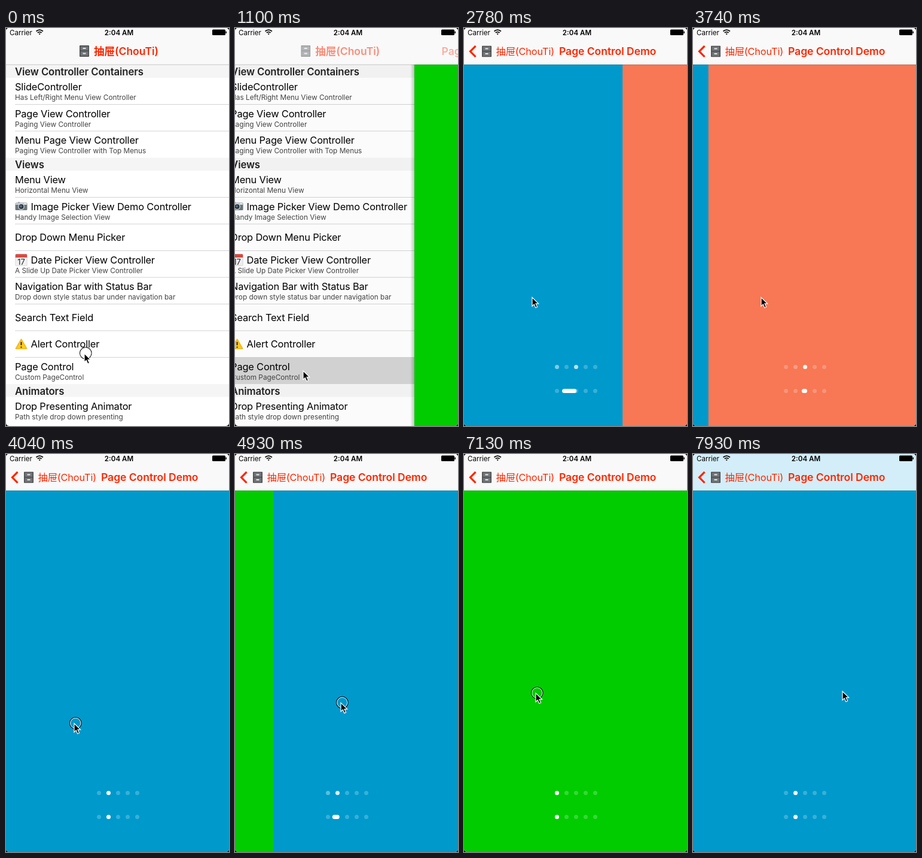
An HTML page that plays this animation: 373x664 px, repeating every 7.99 s.

```html
<!DOCTYPE html>
<html lang="zh-Hans">
<head>
<meta charset="utf-8">
<title>Page control demo</title>
<style>
  html, body { margin: 0; width: 100%; height: 100%; overflow: hidden; background: #000; }
  svg { display: block; width: 373px; height: 664px; border-radius: 5px; background: #fff;
        font-family: Inter, "Noto Sans CJK SC", "Noto Sans CJK", sans-serif; }
  .row { font-size: 16.4px; letter-spacing: -.17px; }
  .sub { font-size: 11.8px; fill: #444; }
  .head { font-size: 16.8px; letter-spacing: -.14px; font-weight: 600; fill: #222; }
  .title { font-size: 17.6px; letter-spacing: -.08px; font-weight: 600; fill: #ff2600; }
  .back { font-size: 16.3px; letter-spacing: -.15px; fill: #ff2600; }
  .status { font-size: 11.6px; }
</style>
</head>
<body>
<svg viewBox="0 0 373 664">
  <defs>
    <symbol id="cabinet" width="16" height="19" viewBox="0 0 16 19">
      <rect width="16" height="19" rx="1" fill="#4b4d4f"/>
      <path d="M1.5 1.5h13v7h-13zM1.5 10h13v7.5h-13z" fill="#717477"/>
      <path d="M5.5 4h5v2h-5zM5.5 12.5h5v2h-5z" fill="#e4e6e7"/>
    </symbol>
    <symbol id="camera" width="21" height="20" viewBox="0 0 21 20">
      <path d="M2 4h3V3h3v1h11q1.5 0 1.5 2v9q0 1.5-1.5 1.5H2Q.5 16.5 .5 15V6Q.5 4 2 4z" fill="#6b767b"/>
      <path d="M.5 6.5Q.5 4 2 4h17q1.5 0 1.5 2v1.500H.5z" fill="#c3ccd0"/>
      <circle cx="10.5" cy="10.5" r="5.3" fill="#d5dcdf"/>
      <circle cx="10.5" cy="10.5" r="4" fill="#2b323a"/>
      <circle cx="10" cy="10" r="2" fill="#53708c"/>
      <path d="M15.5 5h3v1.5h-3z" fill="#fff"/>
    </symbol>
    <symbol id="calendar" width="21" height="21" viewBox="0 0 21 21">
      <rect x=".8" y=".8" width="19.4" height="19.4" rx="1.5" fill="#f1f1f1" stroke="#c8c8c8" stroke-width=".6"/>
      <path d="M.8 6.5V2.3Q.8 .8 2.3 .8h16.4q1.5 0 1.5 1.5V6.500z" fill="#d74b43"/>
      <text x="10.5" y="18" font-size="13" text-anchor="middle" fill="#222">17</text>
    </symbol>
    <symbol id="warning" width="21" height="20" viewBox="0 0 21 20">
      <path d="M10.5 2 19.5 17.5H1.500z" fill="#ffcd1c" stroke="#f4b91b" stroke-width="1.8" stroke-linejoin="round"/>
      <path d="M10.5 6.500v5.500M10.5 14.300v1.800" stroke="#222" stroke-width="2"/>
    </symbol>
    <linearGradient id="edge"><stop offset="0" stop-opacity="0"/><stop offset="1" stop-opacity=".22"/></linearGradient>
  </defs>

  <g id="list"></g>

  <g id="screen">
    <rect x="-7" y="61" width="7" height="603" fill="url(#edge)"/>
    <g id="pages"></g>
    <g id="dots" fill="#fff"></g>
  </g>

  <rect id="bar" width="373" height="61"/>
  <path d="M0 61.2H373" stroke="#000" stroke-opacity=".28" stroke-width=".7"/>
  <g id="rootTitle">
    <use href="#cabinet" x="123" y="29"/>
    <text class="title" x="147" y="45">抽屉(ChouTi)</text>
  </g>
  <g id="back">
    <use href="#cabinet" x="30" y="29.5"/>
    <text class="back" x="53.5" y="45">抽屉(ChouTi)</text>
  </g>
  <path id="chevron" d="M19.5 30 10.5 39l9 9.2" fill="none" stroke="#ff2600" stroke-width="3.2"/>
  <text id="demoTitle" class="title" x="159" y="45">Page Control Demo</text>

  <text class="status" x="6" y="11.6">Carrier</text>
  <g fill="none" stroke="#000" stroke-width="1.7">
    <path d="M50.5 5.5q5.7-4.6 11.4 0M52.7 7.9q3.5-2.7 7 0"/>
    <path d="M54.6 9.6q1.6-1.2 3.2 0L56.2 11.5z" fill="#000" stroke="none"/>
  </g>
  <text class="status" x="189" y="11.6" text-anchor="middle" font-weight="600">2:04 AM</text>
  <rect x="345" y="2.5" width="22" height="9.5" rx="1.5"/>
  <path d="M367.5 5.5h1.5v3.5h-1.5z"/>

  <g id="cursor">
    <g id="ring" fill="none">
      <circle cx="2.3" cy="-.5" r="9.7" stroke="#000" stroke-width="1.2"/>
      <circle cx="2.3" cy="-.5" r="8.7" stroke="#fff" stroke-width="1"/>
    </g>
    <path d="M0 0V14.5L3.3 11.4 5.8 17.2 8.5 16 6 10.4H10.6z" stroke="#fff" stroke-width="1.2"/>
  </g>
</svg>
<script>
const LOOP = 7990, W = 373, ROW = 44.5;
const $ = id => document.getElementById(id);
const clamp = v => Math.max(0, Math.min(1, v));
const mix = (a, b, p) => a + (b - a) * p;
const easeInOut = p => .5 - .5 * Math.cos(Math.PI * p);
const easeOut = p => 1 - (1 - p) ** 3;
const span = (t, a, b) => clamp((t - a) / (b - a));

function add(parent, tag, attrs, text) {
  const el = document.createElementNS('http://www.w3.org/2000/svg', tag);
  for (const key in attrs) el.setAttribute(key, attrs[key]);
  if (text) el.textContent = text;
  return parent.appendChild(el);
}
const shift = (id, x, y = 0) => $(id).setAttribute('transform', `translate(${x} ${y})`);
const fade = (id, v) => $(id).setAttribute('opacity', v);

// Each section: heading, then rows of [title, subtitle, icon].
const sections = [
  ['View Controller Containers',
    ['SlideController', 'Has Left/Right Menu View Controller'],
    ['Page View Controller', 'Paging View Controller'],
    ['Menu Page View Controller', 'Paging View Controller with Top Menus']],
  ['Views',
    ['Menu View', 'Horizontal Menu View'],
    ['Image Picker View Demo Controller', 'Handy Image Selection View', 'camera'],
    ['Drop Down Menu Picker'],
    ['Date Picker View Controller', 'A Slide Up Date Picker View Controller', 'calendar'],
    ['Navigation Bar with Status Bar', 'Drop down style status bar under navigation bar'],
    ['Search Text Field'],
    ['Alert Controller', '', 'warning'],
    ['Page Control', 'Custom PageControl']],
  ['Animators',
    ['Drop Presenting Animator', 'Path style drop down presenting']]
];

const list = $('list');
let y = 61;
for (const [heading, ...rows] of sections) {
  const height = y === 61 ? 22 : 21.5;
  add(list, 'rect', { y, width: W, height, fill: '#f5f5f5' });
  add(list, 'text', { class: 'head', x: 15, y: y + 17.7 }, heading);
  y += height;
  rows.forEach(([title, subtitle, icon], i) => {
    if (title === 'Page Control')
      add(list, 'rect', { id: 'highlight', y, width: W, height: ROW, fill: '#d4d4d4' });
    const base = y + (subtitle ? 21 : 28.3);
    if (icon) add(list, 'use', { href: '#' + icon, x: 15, y: base - 16 });
    add(list, 'text', { class: 'row', x: icon ? 41.5 : 15, y: base }, title);
    if (subtitle) add(list, 'text', { class: 'sub', x: 15, y: y + 37 }, subtitle);
    y += ROW;
    if (i < rows.length - 1)
      add(list, 'path', { d: `M15 ${y}H${W}`, stroke: '#c8c7cc', 'stroke-width': .8 });
  });
}
add(list, 'rect', { id: 'shade', y: 61, width: W, height: 603 });

['#00cc00', '#0099cc', '#f87754'].forEach((fill, i) =>
  add($('pages'), 'rect', { x: i * W, y: 61, width: W + .5, height: 603, fill }));

const dotX = i => 155.5 + 16 * i;
const fadeDots = [];
for (let i = 0; i < 5; i++) {
  fadeDots.push(add($('dots'), 'circle', { cx: dotX(i), cy: 565.5, r: 3.5 }));
  add($('dots'), 'circle', { cx: dotX(i), cy: 605.5, r: 3.5, opacity: .22 });
}
const pill = add($('dots'), 'rect', { y: 602, height: 7, rx: 3.5 });

// Scroll moves: start, end, page before, page after, easing.
const scrolls = [
  [2520, 2960, 0, 2, easeInOut],
  [3680, 4040, 2, 1, easeInOut],
  [4720, 4960, 1, .82, easeInOut],
  [4960, 5230, .82, 0, easeOut],
  [6500, 6760, 0, .5, easeInOut],
  [6760, 7110, .5, 0, easeInOut],
  [7300, 7520, 0, .27, easeInOut],
  [7520, 7860, .27, 1, easeOut]
];

// Pointer stops: time, x, y.
const stops = [
  [0, 131, 543], [350, 131, 543], [850, 114, 572], [1820, 114, 572], [2130, 114, 449.5],
  [4720, 114, 449.5], [4970, 181, 413], [5350, 181, 413], [5740, 268, 430], [5860, 268, 430],
  [6320, 3, 438], [6500, 3, 438], [7110, 120, 399], [7300, 120, 399], [7540, 22, 402],
  [7920, 250, 396], [LOOP, 250, 396]
];
const presses = [[0, 30], [900, 1030], [4030, 4970], [5740, 6320], [6500, 7540]];

function drawPages(t) {
  let offset = 0, from = 0, to = 0;
  for (const [a, b, start, end, ease] of scrolls) {
    if (t < a) break;
    offset = mix(start, end, ease(span(t, a, b)));
    const jump = Math.abs(end - start) > 1;
    from = jump ? start : Math.floor(offset);
    to = jump ? end : Math.ceil(offset);
  }
  const p = from === to ? 0 : (offset - from) / (to - from);
  shift('pages', -offset * W);
  fadeDots.forEach((dot, i) => {
    const lit = i === from ? 1 - p : i === to ? p : 0;
    dot.setAttribute('opacity', .22 + .78 * lit);
  });
  const width = 7 + 9.5 * Math.abs(to - from) * Math.sin(Math.PI * p);
  pill.setAttribute('x', dotX(offset) - width / 2);
  pill.setAttribute('width', width);
}

function drawPush(t) {
  const s = Math.max(0, t - 1056.5) * .01826;
  const p = t >= 1560 ? 1 : 1 - (1 + s) * Math.exp(-s);
  shift('list', -112 * p);
  fade('shade', .08 * p);
  fade('highlight', t > 960 ? 1 : 0);
  shift('screen', W * (1 - p));
  fade('screen', p > 0 ? 1 : 0);
  shift('rootTitle', -65 * p);
  fade('rootTitle', clamp(1 - 2.5 * p));
  shift('back', 92 * (1 - p));
  fade('back', clamp(2 * p - 1));
  fade('chevron', clamp(2 * p - 1));
  shift('demoTitle', 232 * (1 - p));
  fade('demoTitle', clamp(1.8 * p));
}

function drawPointer(t) {
  const i = stops.findIndex(stop => stop[0] > t);
  const [a, ax, ay] = stops[i - 1], [b, bx, by] = stops[i];
  const p = easeInOut(span(t, a, b));
  shift('cursor', mix(ax, bx, p), mix(ay, by, p));
  fade('ring', presses.some(([down, up]) => t >= down && t < up) ? 1 : 0);
}

function draw(t) {
  drawPages(t);
  drawPush(t);
  drawPointer(t);
  const tint = span(t, 7480, 7900);
  $('bar').setAttribute('fill', `rgb(${mix(249, 211, tint)},${mix(249, 238, tint)},${mix(249, 248, tint)})`);
}

const began = performance.now();
(function tick() {
  draw((performance.now() - began) % LOOP);
  requestAnimationFrame(tick);
})();
</script>
</body>
</html>
```
